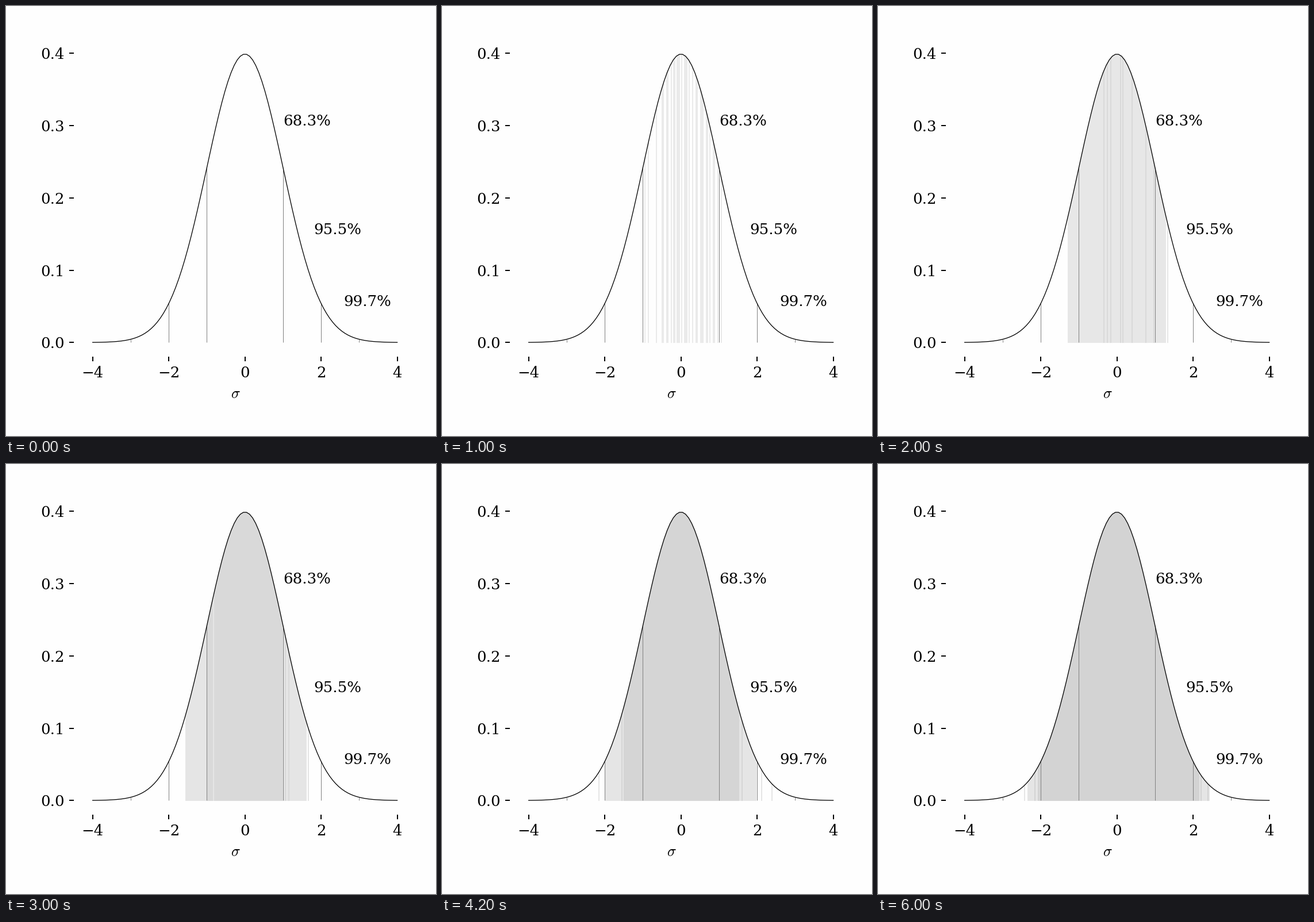
These frames come from a looping animation (748x748 px, 6200 ms). A matplotlib script:

```python
import matplotlib.pyplot as plt
import numpy as np
from matplotlib.animation import FuncAnimation
from matplotlib.patches import Polygon

SIZE, DPI = 748, 136
PT = 72 / DPI                                # points per pixel
FRAMES, INTERVAL = 31, 200
LEFT, RIGHT, BOTTOM = 117.6, 680.6, 610.45   # axes edges in pixels
X_LIM, Y_LIM = (-4.5, 4), (-0.02, 0.41)
Y_SCALE = 1257.5                             # pixels per unit of density
REACH, CELLS = 2.9, 192                      # cells are two pixels wide

plt.rcParams.update({
    "font.family": "DejaVu Serif",
    "font.size": 26 * PT,
    "mathtext.fontset": "cm",
})


def pdf(x):
    return np.exp(-x * x / 2) / np.sqrt(2 * np.pi)


# Samples pile up from the middle outwards, so the step at which a cell
# is first hit grows with the square of its distance; some hit early.
rng = np.random.default_rng(7)
sigma = (np.arange(CELLS) + 0.5) / CELLS * 2 * REACH - REACH
typical = np.maximum(2 + 5 * sigma**2, rng.uniform(3, 7, CELLS))
light = np.maximum(typical + 1 - rng.exponential(1.6, CELLS), 1)
dark = 8.5 + 0.9 * light


def shade(step):
    """One row of RGBA greys, one per cell."""
    light_grey = np.interp(step, [0, 15], [237, 229])
    dark_grey = np.interp(step, [15, 25], [217, 211])
    row = np.empty((1, CELLS, 4))
    row[..., :3] = np.where(dark <= step, dark_grey, light_grey)[:, None] / 255
    row[..., 3] = light <= step
    return row


fig = plt.figure(figsize=(SIZE / DPI, SIZE / DPI), dpi=DPI,
                 facecolor="#fefefe")
height = (Y_LIM[1] - Y_LIM[0]) * Y_SCALE
ax = fig.add_axes([LEFT / SIZE, 1 - BOTTOM / SIZE,
                   (RIGHT - LEFT) / SIZE, height / SIZE])
ax.set_facecolor("none")
ax.spines[:].set_visible(False)

image = ax.imshow(shade(0), aspect="auto", interpolation="nearest", zorder=1,
                  extent=(-REACH, REACH, -0.01, Y_LIM[1]))
ax.set(xlim=X_LIM, ylim=Y_LIM)

x = np.linspace(-4, 4, 100)
outline = [(-4, -0.0006), *zip(x, pdf(x) + 0.0004), (4, -0.0006)]
image.set_clip_path(Polygon(outline, transform=ax.transData))

for s in (-3, -2, -1, 1, 2, 3):
    ax.plot([s, s], [0, pdf(s)], color="gray", lw=PT, zorder=2,
            solid_capstyle="butt")
ax.plot(x, pdf(x), color="black", lw=1.3 * PT, zorder=3, clip_on=False)

for s, y, label in ((1, 0.3, "68.3%"), (1.8, 0.15, "95.5%"),
                    (2.6, 0.05, "99.7%")):
    ax.text(s, y, label, zorder=4)

ax.tick_params(length=8 * PT, width=2 * PT, pad=8 * PT)
ax.set_xticks(range(-4, 5, 2))
ax.set_yticks(np.arange(5) / 10)
fig.text((LEFT + RIGHT) / 2 / SIZE, 1 - 682.4 / SIZE, r"$\sigma$",
         ha="center", va="baseline")


def update(step):
    image.set_data(shade(step))
    return [image]


anim = FuncAnimation(fig, update, frames=FRAMES, interval=INTERVAL,
                     repeat=True, repeat_delay=0, blit=False)
plt.show()
```
